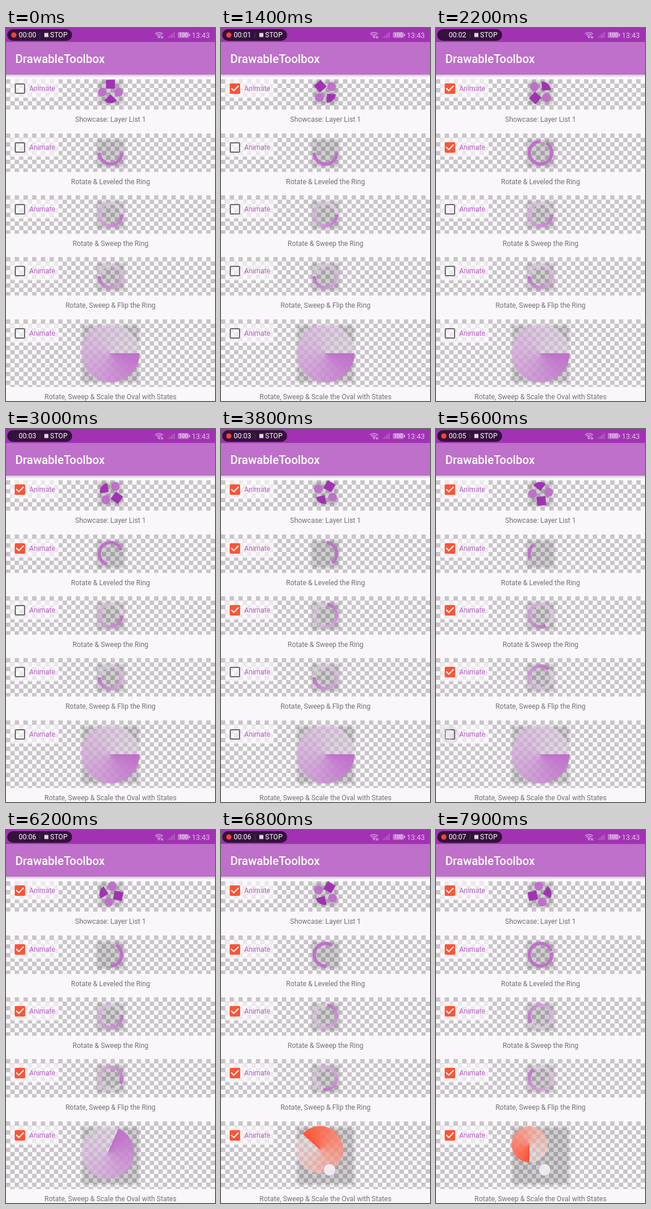
Animation, 360 px wide and 640 px high, one loop 8 s. Source, as an HTML page with a canvas:

```html
<!DOCTYPE html>
<html lang="en">
<head>
<meta charset="utf-8">
<title>DrawableToolbox</title>
<style>
html, body { margin: 0; width: 100%; height: 100%; overflow: hidden; background: #faf7fb; }
canvas { display: block; width: 360px; height: 640px; }
</style>
</head>
<body>
<canvas></canvas>
<script>
const LOOP = 8, STEP = 0.1, SPIN = Math.PI * 2 / 3; // a turn takes three seconds
const PAGE = '#faf7fb', DARK = '#a133b3', PURPLE = '#bf70ca', ORANGE = '#ff5436';
const FONT = 'Roboto, sans-serif', CELL = 7.5;
const PRESS = { time: 6.5, x: 187, y: 583 };

// start: the moment the row's checkbox is ticked
const rows = [
  { label: 'Showcase: Layer List 1', top: 88, height: 52, center: 110, size: 44, panel: 88, start: 1.05, draw: layerList },
  { label: 'Rotate & Leveled the Ring', start: 1.95, draw: leveledRing },
  { label: 'Rotate & Sweep the Ring', start: 3.13, draw: sweepRing },
  { label: 'Rotate, Sweep & Flip the Ring', start: 4.46, draw: flippedRing },
  { label: 'Rotate, Sweep & Scale the Oval with States', height: 116, size: 100, start: 5.65, draw: scaledOval },
].map((row, i) => {
  const top = Math.floor(181 + 106.34 * (i - 1)), height = row.height || 66;
  return { top, height, center: top + height / 2, size: 50, panel: top + 8, ...row };
});

const canvas = document.querySelector('canvas');
const ctx = canvas.getContext('2d');
const ratio = window.devicePixelRatio || 1;
canvas.width = 360 * ratio;
canvas.height = 640 * ratio;

const checker = makeChecker();

function makeChecker() {
  const tile = document.createElement('canvas');
  tile.width = tile.height = 2 * CELL;
  const c = tile.getContext('2d');
  c.fillStyle = '#fbf9fb';
  c.fillRect(0, 0, 2 * CELL, 2 * CELL);
  c.fillStyle = '#c8c4c8';
  c.fillRect(0, 0, CELL, CELL);
  c.fillRect(CELL, CELL, CELL, CELL);
  return ctx.createPattern(tile, 'repeat');
}

function rect(x, y, w, h, color, radius = 0) {
  ctx.fillStyle = color;
  ctx.beginPath();
  ctx.roundRect(x, y, w, h, radius);
  ctx.fill();
}

function circle(x, y, r, color) {
  ctx.fillStyle = color;
  ctx.beginPath();
  ctx.arc(x, y, r, 0, Math.PI * 2);
  ctx.fill();
}

function arc(x, y, r, from, to, color, width) {
  ctx.strokeStyle = color;
  ctx.lineWidth = width;
  ctx.beginPath();
  ctx.arc(x, y, r, from, to);
  ctx.stroke();
}

function text(value, x, y, size, color, weight = 400, align = 'left') {
  ctx.font = `${weight} ${size}px ${FONT}`;
  ctx.fillStyle = color;
  ctx.textAlign = align;
  ctx.fillText(value, x, y);
}

function sweepGradient(color, faded) {
  const gradient = ctx.createConicGradient(0, 0, 0);
  gradient.addColorStop(0, color);
  gradient.addColorStop(1, faded);
  return gradient;
}

const purpleSweep = () => sweepGradient(PURPLE, 'rgba(246,230,249,0.42)');
const orangeSweep = () => sweepGradient(ORANGE, 'rgba(255,236,236,0.45)');
const ring = (from, to, color) => arc(0, 0, 19.4, from, to, color, 5.6);

// Drawables are centred on the origin; age is the time since the tick.
function layerList(age) {
  ctx.rotate(-SPIN * age);
  rect(-7.7, -21.3, 15.4, 15.4, DARK);
  circle(-14, 0, 7.6, PURPLE);
  circle(14, 0, 7.6, PURPLE);
  ctx.fillStyle = DARK;
  ctx.beginPath();
  ctx.moveTo(0, 3.8);
  ctx.arc(0, 3.8, 15.2, Math.PI / 4, Math.PI * 3 / 4);
  ctx.fill();
}

function leveledRing(age, active) {
  const level = active ? Math.abs(1 - age / 3 % 2) : 0.5;
  const from = level * Math.PI * 4;
  ring(from, from + level * Math.PI * 2, PURPLE);
}

function sweepRing(age) {
  ctx.rotate(-SPIN * age);
  ring(0, Math.PI * 2, purpleSweep());
}

function flippedRing(age) {
  ctx.scale(-1, 1);
  sweepRing(age);
}

function scaledOval(age, active, time) {
  const r = 50 * (1 - age / 6);
  ctx.translate(r - 50, r - 50);
  ctx.rotate(-SPIN * age);
  circle(0, 0, r, time >= PRESS.time ? orangeSweep() : purpleSweep());
}

function drawElevation(row) {
  const half = row.size / 2, away = 1000;
  ctx.save();
  ctx.shadowColor = 'rgba(0,0,0,0.17)';
  ctx.shadowBlur = 4 * ratio;
  ctx.shadowOffsetX = away * ratio;
  ctx.shadowOffsetY = ratio;
  rect(180 - half + 1 - away, row.center - half + 1, row.size - 2, row.size - 2, '#000');
  ctx.restore();
}

function drawCheckbox(y, checked) {
  if (!checked) {
    ctx.strokeStyle = '#6c696d';
    ctx.lineWidth = 2;
    ctx.beginPath();
    ctx.roundRect(16, y - 8, 16, 16, 1.5);
    ctx.stroke();
    return;
  }
  rect(15, y - 9, 18, 18, ORANGE, 2);
  ctx.strokeStyle = '#fff';
  ctx.lineWidth = 2;
  ctx.beginPath();
  ctx.moveTo(17.7, y - 0.7);
  ctx.lineTo(22, y + 3.6);
  ctx.lineTo(30.3, y - 4.7);
  ctx.stroke();
}

function drawTouch(x, y, opacity) {
  ctx.globalAlpha = opacity;
  circle(x, y, 10.5, 'rgba(250,246,251,0.8)');
  arc(x, y, 10.5, 0, Math.PI * 2, 'rgba(140,110,150,0.45)', 1);
  ctx.globalAlpha = 1;
}

function drawRow(row, index, time) {
  const active = time >= row.start;
  const sinceTick = time - row.start;
  const age = Math.max(0, sinceTick);
  const boxY = row.panel + 16;

  ctx.save();
  ctx.translate(0, row.top);
  rect(0, 0, 360, row.height, checker);
  ctx.restore();
  drawElevation(row);

  ctx.save();
  ctx.translate(180, row.center);
  row.draw(age, active, time);
  ctx.restore();

  rect(8, row.panel, 83, 32, 'rgba(252,249,253,0.68)', 2);
  if (sinceTick > -0.12 && sinceTick < 0.25) {
    circle(24, boxY, 16, `rgba(90,70,95,${0.08 * (1 - age / 0.25)})`);
  }
  drawCheckbox(boxY, active);
  text('Animate', 40, boxY + 4, 12, '#b95fc8');
  text(row.label, 180, row.top + row.height + 21, 12, '#717073', 400, 'center');
  if (sinceTick > -0.12 && !active) drawTouch(20, boxY + 1, 0.4);

  // A ticked row cross-fades with its old self and dips in opacity.
  const fade = age / 0.25;
  if (index && fade > 0 && fade < 1) {
    ctx.globalAlpha = 1.2 * fade * (1 - fade);
    rect(0, row.top, 360, row.height + 36, PAGE);
    ctx.globalAlpha = 1;
  }
}

function drawStatusBar(time) {
  const seconds = Math.floor(time + 1e-6);
  rect(0, 0, 360, 24, DARK);
  rect(2, 2, 112, 20, '#35113d', 10);
  if (!seconds || time - seconds >= 0.399) circle(13.5, 12, 4.5, '#f8442f');
  text('00:0' + seconds, 22, 16, 12, '#fff');
  rect(58, 7, 1, 10, 'rgba(255,255,255,0.15)');
  rect(66, 8.5, 7, 7, '#dfd6e1');
  text('STOP', 76, 16, 12, '#fff');

  const icon = '#e3bfe9', faint = 'rgba(227,191,233,0.35)';
  [3.5, 6.5, 9.5].forEach(r => arc(263.5, 17, r, -Math.PI * 0.75, -Math.PI * 0.25, icon, 1.2));
  circle(263.5, 16.3, 1.2, icon);
  rect(267, 14, 1.2, 4, icon);
  rect(269.2, 14, 1.2, 4, icon);
  for (let i = 0; i < 5; i++) rect(279 + i * 2.5, 15 - i * 2, 1.5, 2 + i * 2, faint);
  rect(296, 7, 19, 10, 'rgba(227,191,233,0.5)', 2);
  rect(315.5, 10, 1.5, 4, icon);
  text('100', 305.5, 15.2, 9, '#f6e6f9', 400, 'center');
  text('13:43', 320, 16.5, 12.5, icon);
}

function drawToolbar() {
  const shadow = ctx.createLinearGradient(0, 80, 0, 85);
  shadow.addColorStop(0, 'rgba(60,30,65,0.22)');
  shadow.addColorStop(1, 'rgba(60,30,65,0)');
  rect(0, 80, 360, 5, shadow);
  rect(0, 24, 360, 56, PURPLE);
  text('DrawableToolbox', 16, 59.5, 20, '#fff', 500);
}

function frame(now) {
  const tick = Math.floor(now / 1000 % LOOP / STEP + 1e-6);
  const time = tick < 2 ? 0 : tick * STEP;
  ctx.setTransform(ratio, 0, 0, ratio, 0, 0);
  rect(0, 0, 360, 640, PAGE);
  rows.forEach((row, i) => drawRow(row, i, time));
  if (time >= PRESS.time) drawTouch(PRESS.x, PRESS.y, 1);
  drawToolbar();
  drawStatusBar(time);
}

const begin = performance.now();
(function play() {
  frame(performance.now() - begin);
  requestAnimationFrame(play);
})();
</script>
</body>
</html>
```
